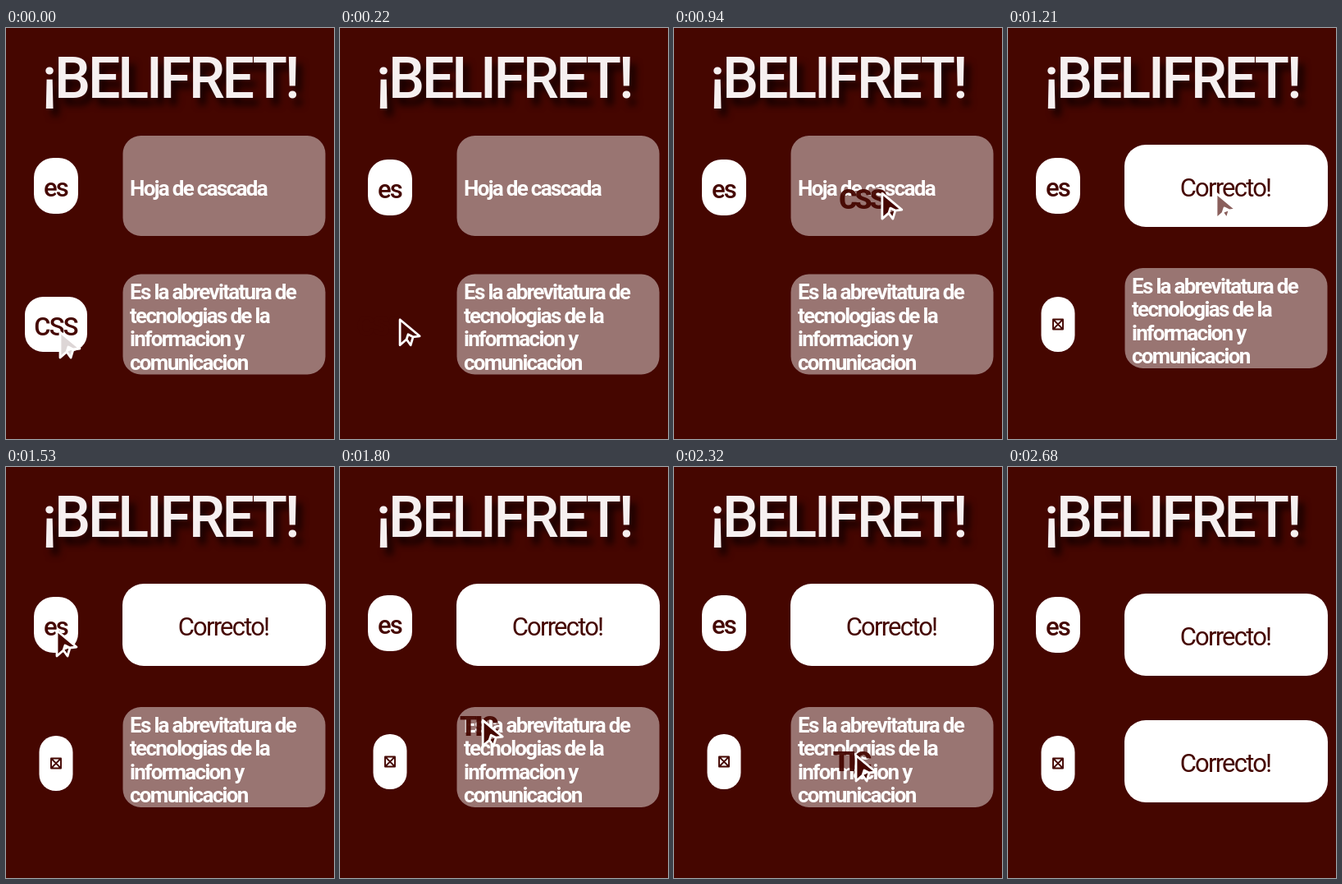
Write an HTML page that moves like this. It is 400x500 px and loops after 2.72 s.

```html
<!DOCTYPE html>
<html lang="es">
<head>
<meta charset="utf-8">
<style>
  html, body { margin: 0; width: 100%; height: 100%; overflow: hidden; background: #450600; }
  svg { display: block; font: 400 31px Roboto, sans-serif; letter-spacing: -1.8px; }
  .title { font-size: 70px; font-weight: 500; letter-spacing: -3.2px; fill: #f6f0f0; filter: drop-shadow(7px 9px 4px #140000); }
  .dark { fill: #450600; text-anchor: middle; }
  .pill { font-weight: 500; }
  .ghost { font-size: 34px; font-weight: 900; letter-spacing: -3.2px; opacity: .95; }
  .glass { fill: #997572; }
  .note { font-size: 26px; font-weight: 700; letter-spacing: -1.7px; fill: #fff; }
  .white { fill: #fff; }
</style>
</head>
<body>
<svg width="400" height="500" viewBox="0 0 400 500">
  <text class="title" x="199.500" y="85" text-anchor="middle">¡BELIFRET!</text>

  <g id="es">
    <rect class="white" x="34" y="158" width="54" height="68" rx="24"/>
    <text class="dark pill" x="60.500" y="205">es</text>
  </g>
  <g id="css">
    <rect class="white" x="23" y="327" width="76" height="67" rx="22"/>
    <text class="dark pill" x="60.500" y="374">CSS</text>
  </g>
  <g id="empty">
    <rect class="white" x="40.500" y="327" width="41" height="67" rx="20"/>
    <path d="M55 354.500h12v12h-12zl12 12m0-12l-12 12" fill="none" stroke="#450600" stroke-width="1.900" stroke-linejoin="round"/>
  </g>

  <g id="sheet">
    <rect class="glass" x="142.500" y="131" width="247" height="122" rx="22"/>
    <text class="note" x="151" y="204">Hoja de cascada</text>
  </g>
  <g id="tech">
    <rect class="glass" x="142.500" y="299.500" width="247" height="122" rx="22"/>
    <text class="note" y="330">
      <tspan x="151">Es la abrevitatura de</tspan>
      <tspan x="151" dy="28.600">tecnologias de la</tspan>
      <tspan x="151" dy="28.600">informacion y</tspan>
      <tspan x="151" dy="28.600">comunicacion</tspan>
    </text>
  </g>
  <g id="right1">
    <rect class="white" x="142" y="142" width="248" height="100" rx="26"/>
    <text class="dark" x="265" y="205">Correcto!</text>
  </g>
  <g id="right2">
    <rect class="white" x="142" y="308" width="248" height="100" rx="26"/>
    <text class="dark" x="265" y="371">Correcto!</text>
  </g>

  <text id="ghost" class="dark ghost"></text>
  <path id="cursor" d="M0 1V32L8 25L13 32L16 22L24 21ZM8 25L10 19L16 22" stroke="#fff" stroke-width="2.800" stroke-linejoin="round"/>
</svg>
<script>
const LOOP = 2720, GRAB1 = 120, DROP1 = 1100, GRAB2 = 1540, DROP2 = 2360;
// time, x, y of the pointer tip
const path = [
  [0, 66, 369], [120, 66, 369], [220, 73, 354], [660, 229, 222], [960, 254, 200],
  [1240, 254, 200], [1490, 62, 198], [1550, 62, 198], [1800, 174, 307],
  [2080, 212, 341], [2250, 222, 350], [2720, 222, 350]
];
const el = id => document.getElementById(id);
const show = (id, on) => el(id).style.display = on ? '' : 'none';
const move = (id, x, y) => el(id).setAttribute('transform', `translate(${x} ${y})`);

const slope = (i, axis) => path[i + 1]
  ? (path[i + 1][axis] - path[i][axis]) / (path[i + 1][0] - path[i][0]) : 0;

// Monotone tangent: zero at rests and turns
function tangent(i, axis) {
  if (!i) return 0;
  const a = slope(i - 1, axis), b = slope(i, axis);
  return a * b > 0 ? 2 * a * b / (a + b) : 0;
}

function pointer(t, axis) {
  const i = path.findIndex((p, k) => t < path[k + 1][0]);
  const [p, q] = [path[i], path[i + 1]], d = q[0] - p[0], u = (t - p[0]) / d, v = 1 - u;
  return p[axis] * (1 + 2 * u) * v * v + q[axis] * u * u * (3 - 2 * u)
    + d * u * v * (tangent(i, axis) * v - tangent(i + 1, axis) * u);
}

function draw(now) {
  const t = now % LOOP;
  const drag1 = t >= GRAB1 && t < DROP1, drag2 = t >= GRAB2 && t < DROP2;
  const first = t >= DROP1, second = t >= DROP2;
  const x = pointer(t, 1), y = pointer(t, 2);

  show('css', t < GRAB1);
  show('empty', first);
  show('sheet', !first);
  show('right1', first);
  show('tech', !second);
  show('right2', second);
  move('es', 0, drag1 ? 2 : drag2 ? -2 : 0);
  move('empty', 0, drag2 ? -2 : 0);
  move('tech', 0, first ? -7.5 : 0);
  move('right1', 0, second ? 12 : 0);

  show('ghost', drag1 || drag2);
  el('ghost').textContent = drag1 ? 'CSS' : 'TIC';
  move('ghost', x - (drag1 ? 25 : 6), y + 20);

  move('cursor', x, y);
  el('cursor').setAttribute('fill', t < GRAB1 ? '#ddd6d6' : first && t < 1300 ? '#8a5f5c' : '#450600');
  el('cursor').style.opacity = Math.max(0, Math.min(1, (2500 - t) / 140));
  requestAnimationFrame(draw);
}
draw(performance.now());
</script>
</body>
</html>
```
